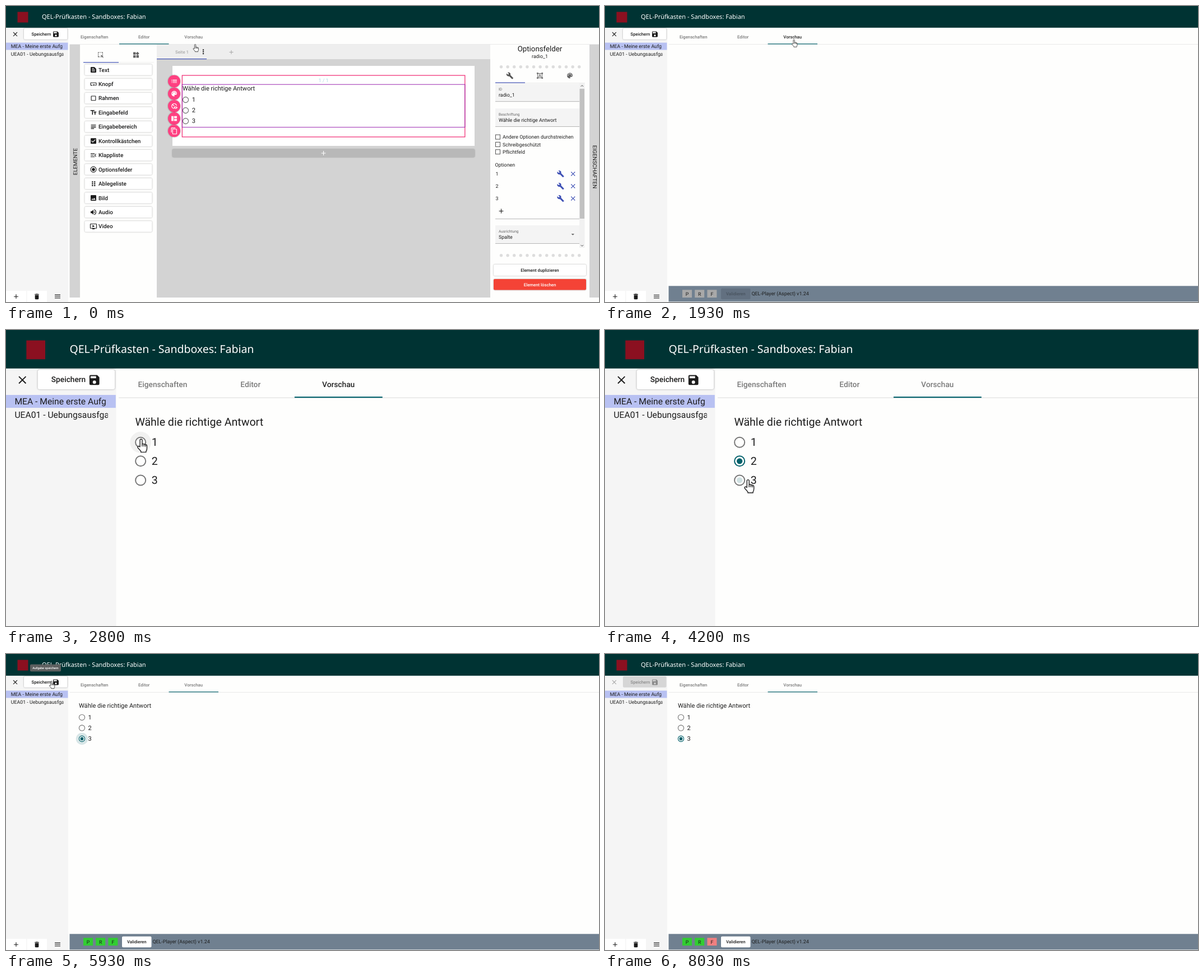
An HTML page for the animation above (8.93 s loop, 1058 by 529 pixels).

```html
<!DOCTYPE html>
<html lang="de">
<head>
<meta charset="utf-8">
<title>Aufgabe ausprobieren</title>
<style>
html, body { margin: 0; width: 100%; height: 100%; overflow: hidden; background: #fefefd; }
svg { display: block; width: 1058px; height: 529px; font-family: Roboto, sans-serif; text-rendering: geometricPrecision; }
.raised { filter: drop-shadow(0 .8px .9px rgba(0,0,0,.35)); }
.m { text-anchor: middle; }
.b { font-weight: 500; }
</style>
</head>
<body>
<svg viewBox="0 0 1058 529"><g id="scene"></g></svg>
<script>
const LOOP = 8930, ZOOM = 1.7722;
const GREY = '#7a7a7a', DARK = '#1c1c1c', TEAL = '#00606a', INDIGO = '#3f51b5', PINK = '#ff4081';

const ICON = {
  close: 'M19 6.4L17.6 5 12 10.6 6.4 5 5 6.4 10.6 12 5 17.6 6.4 19 12 13.4 17.6 19 19 17.6 13.4 12z',
  save: 'M17 3H5a2 2 0 0 0-2 2v14a2 2 0 0 0 2 2h14a2 2 0 0 0 2-2V7zM12 19a3 3 0 1 1 0-6 3 3 0 0 1 0 6zM15 9H5V5h10z',
  add: 'M19 13h-6v6h-2v-6H5v-2h6V5h2v6h6z',
  trash: 'M6 19a2 2 0 0 0 2 2h8a2 2 0 0 0 2-2V7H6zM19 4h-3.5l-1-1h-5l-1 1H5v2h14z',
  menu: 'M3 18h18v-2H3zM3 13h18v-2H3zM3 6v2h18V6z',
  wrench: 'M22.7 19l-9.1-9.1c.9-2.3.4-5-1.5-6.9-2-2-5-2.4-7.4-1.3L9 6 6 9 1.6 4.7C.4 7.1.9 10.1 2.9 12.1c1.9 1.9 4.6 2.4 6.9 1.5l9.1 9.1c.4.4 1 .4 1.4 0l2.3-2.3c.5-.4.5-1.1.1-1.4z',
  palette: 'M12 3a9 9 0 0 0 0 18c1.3 0 1.9-1.4 1.1-2.5-.9-1 0-2.5 1.1-2.5H16a5 5 0 0 0 5-5c0-4.4-4-8-9-8zM6.5 12a1.5 1.5 0 1 1 0-3 1.5 1.5 0 0 1 0 3zM9.5 8a1.5 1.5 0 1 1 0-3 1.5 1.5 0 0 1 0 3zM14.5 8a1.5 1.5 0 1 1 0-3 1.5 1.5 0 0 1 0 3zM17.5 12a1.5 1.5 0 1 1 0-3 1.5 1.5 0 0 1 0 3z',
  list: 'M3 13h2v-2H3zM3 17h2v-2H3zM3 9h2V7H3zM7 13h14v-2H7zM7 17h14v-2H7zM7 7v2h14V7z',
  copy: 'M16 1H4a2 2 0 0 0-2 2v14h2V3h12zM19 5H8a2 2 0 0 0-2 2v14a2 2 0 0 0 2 2h11a2 2 0 0 0 2-2V7a2 2 0 0 0-2-2zM19 21H8V7h11z',
  layout: 'M3 4h7v16H3zM12 4h9v7h-9zM12 13h9v7h-9z',
  hidden: 'M12 3a9 9 0 1 0 0 18v-2a7 7 0 0 1-5.6-11L12 13l1.4-1.4L7.8 6.4A7 7 0 0 1 19 11h2a9 9 0 0 0-9-8zM17 13c-3 0-5 2-6 4 1 2 3 4 6 4s5-2 6-4c-1-2-3-4-6-4zM17 19a2 2 0 1 1 0-4 2 2 0 0 1 0 4z',
  text: 'M20.4 8.4l-4.8-4.8A2 2 0 0 0 14.2 3H5a2 2 0 0 0-2 2v14a2 2 0 0 0 2 2h14a2 2 0 0 0 2-2V9.8zM7 7h7v2H7zM17 17H7v-2h10zM17 13H7v-2h10z',
  button: 'M22 9v6a2 2 0 0 1-2 2h-2v-2h2V9H4v6h5v2H4a2 2 0 0 1-2-2V9a2 2 0 0 1 2-2h16a2 2 0 0 1 2 2zM13.5 11l1.2 2.8 2.8 1.2-2.8 1.2-1.2 2.8-1.2-2.8L9.500 15l2.800-1.200z',
  frame: 'M18 4H6a2 2 0 0 0-2 2v12a2 2 0 0 0 2 2h12a2 2 0 0 0 2-2V6a2 2 0 0 0-2-2zM18 18H6V6h12z',
  field: 'M2.500 4v3h5v12h3V7h5V4zM21.500 9h-9v3h3v7h3v-7h3z',
  area: 'M14 17H4v2h10zM20 9H4v2h16zM4 15h16v-2H4zM4 5v2h16V5z',
  check: 'M19 3H5a2 2 0 0 0-2 2v14a2 2 0 0 0 2 2h14a2 2 0 0 0 2-2V5a2 2 0 0 0-2-2zM10 17l-5-5 1.400-1.400L10 14.200l7.600-7.600L19 8z',
  drop: 'M3 18h13v-2H3zM3 13h10v-2H3zM3 6v2h13V6zM21 15.600L17.400 12 21 8.400 19.600 7l-5 5 5 5z',
  radio: 'M12 2a10 10 0 1 0 0 20 10 10 0 0 0 0-20zM12 20a8 8 0 1 1 0-16 8 8 0 0 1 0 16zM12 7a5 5 0 1 0 0 10 5 5 0 0 0 0-10z',
  grip: [4, 10, 16].map(y => `M7 ${y}h4v4H7zM14 ${y}h4v4h-4z`).join(''),
  image: 'M21 19V5a2 2 0 0 0-2-2H5a2 2 0 0 0-2 2v14a2 2 0 0 0 2 2h14a2 2 0 0 0 2-2zM8.500 13.500l2.500 3L14.500 12l4.500 6H5z',
  audio: 'M3 9v6h4l5 5V4L7 9zM16.500 12A4.500 4.500 0 0 0 14 8v8a4.500 4.500 0 0 0 2.500-4zM14 3.200v2.100a7 7 0 0 1 0 13.400v2.100a9 9 0 0 0 0-17.600z',
  video: 'M21 3H3a2 2 0 0 0-2 2v12a2 2 0 0 0 2 2h5v2h8v-2h5a2 2 0 0 0 2-2V5a2 2 0 0 0-2-2zM21 17H3V5h18zM16 11l-7 4V7z',
  widgets: 'M13 13v8h8v-8zM3 21h8v-8H3zM3 3v8h8V3zM16.700 1.700L11 7.300l5.700 5.700 5.600-5.700z',
  select: 'M3 3h4v2H5v2H3zM9 3h3v2H9zM14 3h5v4h-2V5h-3zM3 9h2v3H3zM3 14h2v3h3v2H3zM10 17h2v2h-2zM17 9h2v3h-2zM12 12l9 3-3.500 1.600L21 20l-1.400 1.400-3.400-3.400L15 21z',
  box: 'M2 2h5v2h10V2h5v5h-2v10h2v5h-5v-2H7v2H2v-5h2V7H2zM7 6v1H6v10h1v1h10v-1h1V7h-1V6zM11 7h2l4 10h-2l-1-2.500h-4L9 17H7zM12 9.500L10.700 13h2.600z',
  more: [4, 10, 16].map(y => `M10 ${y}h4v4h-4z`).join(''),
};

const rect = (x, y, w, h, fill, more = '') => `<rect x="${x}" y="${y}" width="${w}" height="${h}" fill="${fill}" ${more}/>`;
const text = (x, y, size, str, fill = DARK, cls = '', more = '') =>
  `<text x="${x}" y="${y}" font-size="${size}" fill="${fill}" class="${cls}" ${more}>${str}</text>`;
const circle = (x, y, r, fill, more = '') => `<circle cx="${x}" cy="${y}" r="${r}" fill="${fill}" ${more}/>`;
const icon = (name, x, y, fill = DARK, size = 13.3) =>
  `<path transform="translate(${x - size / 2} ${y - size / 2}) scale(${size / 24})" fill="${fill}" fill-rule="evenodd" d="${ICON[name]}"/>`;
const group = (id, inner, more = '') => `<g id="${id}" ${more}>${inner}</g>`;
const raised = (x, y, w, h, fill = '#fff') => rect(x, y, w, h, fill, 'rx="2" class="raised"');
const rows = (list, fn) => list.map(fn).join('');

function shell() {
  return rect(0, 0, 1058, 529, '#fefefd') + rect(0, 38, 111, 491, '#f5f5f5') + rect(0, 0, 1058, 38.8, '#033')
    + rect(20.5, 10.5, 19, 19, '#8b1020')
    + text(64, 23.4, 11, 'QEL-Prüfkasten - Sandboxes: Fabian', '#fff', 'b', 'font-family="Noto Sans, sans-serif"')
    + group('closeIcon', icon('close', 16.5, 50.4))
    + group('saveOn', raised(32, 40, 77.5, 19.8)) + group('saveOff', rect(32, 40, 77.500, 19.8, '#d6d6d6', 'rx="2"'))
    + group('saveRipple', circle(81, 50, 1, '#000', 'opacity=".12"'), 'clip-path="url(#saveClip)"')
    + group('saveLabel', text(45.600, 52.700, 7.740, 'Speichern', DARK, 'b') + icon('save', 89, 50.400))
    + rect(0, 65.500, 110.500, 13, '#b8c1f2')
    + text(8.700, 75.300, 8.850, 'MEA - Meine erste Aufg')
    + `<g clip-path="url(#listClip)">${text(8.700, 88.700, 8.850, 'UEA01 - Uebungsausfgabe')}</g>`
    + rect(0, 509, 36, 20, '#fff') + rect(37.500, 509, 35.500, 20, '#fff')
    + icon('add', 18, 519.200) + icon('trash', 55, 519.200) + icon('menu', 92, 519.200)
    + rect(113.500, 68, 944.500, .600, '#dcdcdc')
    + `<g clip-path="url(#tabClip)">${circle(337, 60, 1, '#000', 'id="tabRipple"')}</g>`
    + text(157.700, 57.500, 7.740, 'Eigenschaften', GREY, 'm b') + text(246.200, 57.500, 7.740, 'Editor', GREY, 'm b')
    + text(334.700, 57.500, 7.740, 'Vorschau', GREY, 'm b', 'id="previewTab"')
    + rect(202, 67.200, 88.500, 1.200, TEAL, 'id="tabLine"');
}

function palette() {
  const items = [['text', 'Text'], ['button', 'Knopf'], ['frame', 'Rahmen'], ['field', 'Eingabefeld'], ['area', 'Eingabebereich'],
    ['check', 'Kontrollkästchen'], ['drop', 'Klappliste'], ['radio', 'Optionsfelder'], ['grip', 'Ablegeliste'],
    ['image', 'Bild'], ['audio', 'Audio'], ['video', 'Video']];
  return rect(113.500, 69, 18.500, 452, '#d3d3d3') + text(0, 0, 9.700, 'ELEMENTE', DARK, 'm', 'transform="translate(126.700 278) rotate(-90)"')
    + icon('select', 169, 87.500, '#666') + icon('widgets', 232, 87.500, '#666') + rect(138, 100.200, 63, 1.200, INDIGO)
    + rect(201, 100.600, 63, .500, '#ddd')
    + rows(items, ([name, label], i) => {
      const y = 114 + i * 25.450;
      return raised(140.500, y - 9.800, 120, 19.500) + icon(name, 156, y) + text(165, y + 3.500, 9.950, label, DARK, 'b');
    });
}

function canvas() {
  const tools = ['list', 'palette', 'hidden', 'layout', 'copy'];
  return rect(269, 69, 595, 452, '#d3d3d3') + rect(269, 69, 595, 26, '#eee')
    + text(302, 84.700, 7.740, 'Seite 1', '#aaa', 'b') + icon('more', 352, 81.700, '#333') + icon('add', 402, 82.500, '#a5a5a5', 12)
    + rect(269, 94, 89, 1.200, INDIGO)
    + rect(297, 107, 539, 143, '#fff') + raised(297, 256, 539, 14, '#b8b8b8') + icon('add', 566.500, 263, '#fff')
    + rect(314.300, 124, 504.500, 110, 'none', 'stroke="#f0246e" stroke-width="1.200"')
    + text(566.500, 135.600, 8.850, '1 / 1', '#add8e6', 'm')
    + rect(314.300, 140.200, 504.500, 76.500, 'none', 'stroke="#9c27b0" stroke-width="1"')
    + text(315, 150.500, 11.060, 'Wähle die richtige Antwort')
    + rows([1, 2, 3], n => {
      const y = 148.600 + n * 19;
      return circle(320.500, y, 5, 'none', 'stroke="#666" stroke-width="1.100"') + text(331.700, y + 3.500, 11.060, n);
    })
    + rows(tools, (name, i) => circle(300, 134.500 + i * 22.200, 11, PINK, 'class="raised"') + icon(name, 300, 134.500 + i * 22.200, '#fff', 13));
}

function properties() {
  const field = (y, label, value) => rect(873, y, 150, 32.500, '#f4f4f4') + rect(873, y + 32, 150, .600, '#8a8a8a')
    + text(879, y + 12.700, 6.640, label, '#666') + text(879, y + 23.500, 8.850, value);
  const dots = y => rows([...Array(13).keys()], i => circle(883.500 + i * 11.600, y, 2.700, '#ddd'));
  return rect(864, 69, 177, 452, '#fefefd') + rect(1041, 69, 17, 452, '#d3d3d3')
    + text(0, 0, 9.850, 'EIGENSCHAFTEN', DARK, 'm', 'transform="translate(1046.500 287.500) rotate(90)"')
    + text(952.500, 81, 13.270, 'Optionsfelder', DARK, 'm') + text(952.500, 93, 8.850, 'radio_1', DARK, 'm')
    + dots(108.700) + dots(445.700)
    + icon('wrench', 899, 124.500, '#555') + icon('box', 952.500, 124.500, '#777') + icon('palette', 1006, 124.500, '#666')
    + rect(873, 137, 160, .500, '#ddd') + rect(873, 136.500, 53, 1.200, INDIGO)
    + field(138.500, 'ID', 'radio_1') + field(183.300, 'Beschriftung', 'Wähle die richtige Antwort') + field(392, 'Ausrichtung', 'Spalte')
    + '<path d="M1008.500 407h5.500l-2.700 2.800z" fill="#666"/>'
    + rows(['Andere Optionen durchstreichen', 'Schreibgeschützt', 'Pflichtfeld'], (label, i) => {
      const y = 234.300 + i * 13.300;
      return rect(873.500, y - 4.200, 8, 8, 'none', 'stroke="#555" stroke-width="1"') + text(886, y + 3, 8.850, label);
    })
    + text(872.500, 286.700, 8.850, 'Optionen')
    + rows([1, 2, 3], n => {
      const y = 278 + n * 22;
      return text(873.500, y + 3, 8.850, n) + icon('wrench', 989.500, y, INDIGO) + icon('close', 1011.700, y, INDIGO);
    })
    + icon('add', 883.500, 366.500) + rect(873, 380, 150, .600, '#8a8a8a')
    + rect(1023, 138, 9.500, 294, '#f1f1f1') + rect(1023.500, 148, 8.500, 232, '#c1c1c1')
    + '<path d="M1025.500 144l2.300-2.300 2.300 2.300M1025.500 427l2.300 2.300 2.300-2.300" fill="none" stroke="#555"/>'
    + raised(870, 462, 165, 20) + text(952.500, 474.700, 7.740, 'Element duplizieren', DARK, 'm b')
    + raised(870, 488, 165, 19.500, '#f44336') + text(952.500, 500.500, 7.740, 'Element löschen', '#fff', 'm b');
}

const radioY = [113.300, 132.200, 151.500];
function preview() {
  const question = text(130, 96.300, 11.060, 'Wähle die richtige Antwort') + rows(radioY, (y, i) =>
    circle(135.500, y, 10.700, '#000', `id="halo${i}"`) + circle(135.500, y, 5.100, '#fefefd', `id="ring${i}" stroke-width="1.100"`)
    + circle(135.500, y, 2.900, TEAL, `id="dot${i}"`) + text(146.500, y + 3.700, 11.060, i + 1));
  const footer = rect(113.500, 500.300, 944.500, 28, '#708090')
    + rows(['P', 'R', 'F'], (c, i) => rect(138 + i * 22.200, 507.300, 17, 13.800, '#a9a9a9', `id="flag${c}"`)
      + text(146.500 + i * 22.200, 517.500, 8.850, c, DARK, 'm'))
    + rect(207, 504.700, 52.500, 19.500, '#fff', 'rx="2" id="validate"')
    + text(233.200, 517.100, 7.740, 'Validieren', DARK, 'm b', 'id="validateText"')
    + text(261.500, 517.300, 8.850, 'QEL-Player (Aspect) v1.24');
  return group('question', question) + footer;
}

const overlays = () =>
  group('snack', raised(434, 498, 190, 26.500, '#323232') + text(447, 513.800, 7.740, 'Aufgabe gespeichert', '#fff'))
  + group('tip', rect(43, 18.500, 55, 12.800, '#616161', 'rx="2" opacity=".95"') + text(70.500, 26.900, 5.530, 'Aufgabe speichern', '#fff', 'm b'))
  + group('cursor', `<g id="hand"><path d="M-1.100 7.800V1.100Q-1.100 0 0 0T1.100 1.100V5Q2.500 4.400 2.900 5.300 4.200 4.800 4.500 5.800 5.900 5.400 5.900 7V9.300Q5.900 11 5 12.200V13.200H-.200V12.200L-3.400 8.600Q-3.700 7-2.300 7.100z"/>
    <path d="M1.100 5v2.500M2.900 5.500v2M4.500 6v1.700"/></g><path id="arrow" d="M0 0V11L2.600 8.600 4.300 12.400 6 11.700 4.300 8H7.600z"/>`,
    'fill="#fff" stroke="#222" stroke-width=".8" stroke-linejoin="round"');

const clip = (id, x, y, w, h) => `<clipPath id="${id}"><rect x="${x}" y="${y}" width="${w}" height="${h}"/></clipPath>`;
const scene = document.getElementById('scene');
scene.innerHTML = clip('listClip', 0, 78, 102.500, 14) + clip('saveClip', 32, 40, 77.500, 19.800) + clip('tabClip', 290.500, 39, 88.500, 29)
  + shell() + group('editor', palette() + canvas() + properties()) + group('preview', preview()) + overlays();

const el = {};
scene.querySelectorAll('[id]').forEach(n => el[n.id] = n);
const set = (id, attrs) => Object.entries(attrs).forEach(([k, v]) => el[id].setAttribute(k, v));
const show = (id, on) => set(id, { opacity: +on });

const part = (t, from, to) => Math.min(1, Math.max(0, (t - from) / (to - from)));
const ease = x => x * x * (3 - 2 * x);
const between = (t, a, b) => t >= a && t < b;

// time, x, y of the pointer tip
const track = [[30, 337.500, 68.500], [330, 337, 60], [2370, 337, 60], [2800, 136, 110], [3260, 136, 110], [3560, 137, 131],
  [3880, 137, 131], [4170, 144, 151], [4360, 144, 151], [4900, 9, 66], [5200, 30, 98], [5260, 30, 98], [5530, 81, 48.500],
  [7560, 81, 48.500], [7900, 73, -20]];
function pointer(t) {
  const i = track.findIndex(k => k[0] > t);
  if (i <= 0) return (i ? track[track.length - 1] : track[0]).slice(1);
  const [a, b] = [track[i - 1], track[i]], p = ease(part(t, a[0], b[0]));
  return [a[1] + (b[1] - a[1]) * p, a[2] + (b[2] - a[2]) * p];
}

function drawRadios(t) {
  const clicks = [3030, 3730, 4330], hovers = [[2740, 3400], [3480, 4020], [4360, 4460]];
  const chosen = clicks.filter(c => t >= c + 30).length - 1;
  radioY.forEach((y, i) => {
    const on = i === chosen, waiting = i === 2 && between(t, 4190, 4360);
    const grow = on ? ease(part(t, clicks[i], clicks[i] + 180)) : 0;
    set('ring' + i, { stroke: on ? TEAL : '#757575' });
    set('dot' + i, { r: waiting ? 2.900 : 2.900 * grow, opacity: waiting ? .180 : 1 });
    const fade = i === 2 ? 1 - part(t, 6300, 6600) : 1 - part(t, clicks[i] + 250, clicks[i] + 450);
    const hover = between(t, ...hovers[i]);
    set('halo' + i, { fill: on ? TEAL : '#000', opacity: on ? .150 * fade : hover ? .050 : 0 });
  });
}

function draw(t) {
  const zoom = between(t, 1930, 5930) ? 1 + (ZOOM - 1) * ease(part(t, 1930, 2373)) : 1;
  set('scene', { transform: `scale(${zoom})` });
}

function render(t) {
  scene.setAttribute('transform', `scale(${between(t, 1930, 5930) ? 1 + (ZOOM - 1) * ease(part(t, 1930, 2373)) : 1})`);
  show('editor', t < 750);
  show('preview', t >= 750);
  show('question', t >= 2020);

  const slide = ease(part(t, 640, 1140)), press = part(t, 630, 1080);
  set('tabLine', { x: 202 + 88.500 * slide });
  set('tabRipple', { r: 75 * ease(press), opacity: t < 630 ? 0 : .100 * (1 - part(t, 1080, 1500)) });
  set('previewTab', { fill: between(t, 630, 3060) ? '#222' : GREY });
  drawRadios(t);

  const ready = t >= 2020;
  set('flagP', { fill: ready ? '#32cd32' : '#a9a9a9' });
  set('flagR', { fill: ready ? '#32cd32' : '#a9a9a9' });
  set('flagF', { fill: t >= 6330 ? '#f08080' : ready ? '#32cd32' : '#a9a9a9' });
  set('validate', { fill: ready ? '#fff' : '#627080' });
  set('validateText', { fill: ready ? DARK : '#48535e' });

  const saved = t >= 6860;
  show('saveOn', !saved);
  show('saveOff', saved);
  set('saveLabel', { opacity: saved ? .400 : 1 });
  set('closeIcon', { opacity: saved ? .350 : 1 });
  el.saveRipple.firstChild.setAttribute('r', 60 * ease(part(t, 6300, 6650)));
  set('saveRipple', { opacity: between(t, 6300, 6860) ? 1 - part(t, 6600, 6860) : 0 });
  set('tip', { opacity: part(t, 5400, 5530) * (1 - part(t, 6860, 6950)) });
  const pop = part(t, 6620, 6770), size = .800 + .200 * ease(pop);
  set('snack', { opacity: pop * (1 - part(t, 7560, 7640)), transform: `translate(529 511) scale(${size}) translate(-529 -511)` });

  const [x, y] = pointer(t);
  const arrow = between(t, 2480, 2730) || between(t, 4480, 4800) || saved;
  set('cursor', { transform: `translate(${x} ${y})` });
  show('hand', !arrow);
  show('arrow', arrow);
}

function tick(now) {
  render(now % LOOP);
  requestAnimationFrame(tick);
}
render(0);
requestAnimationFrame(tick);
</script>
</body>
</html>
```
